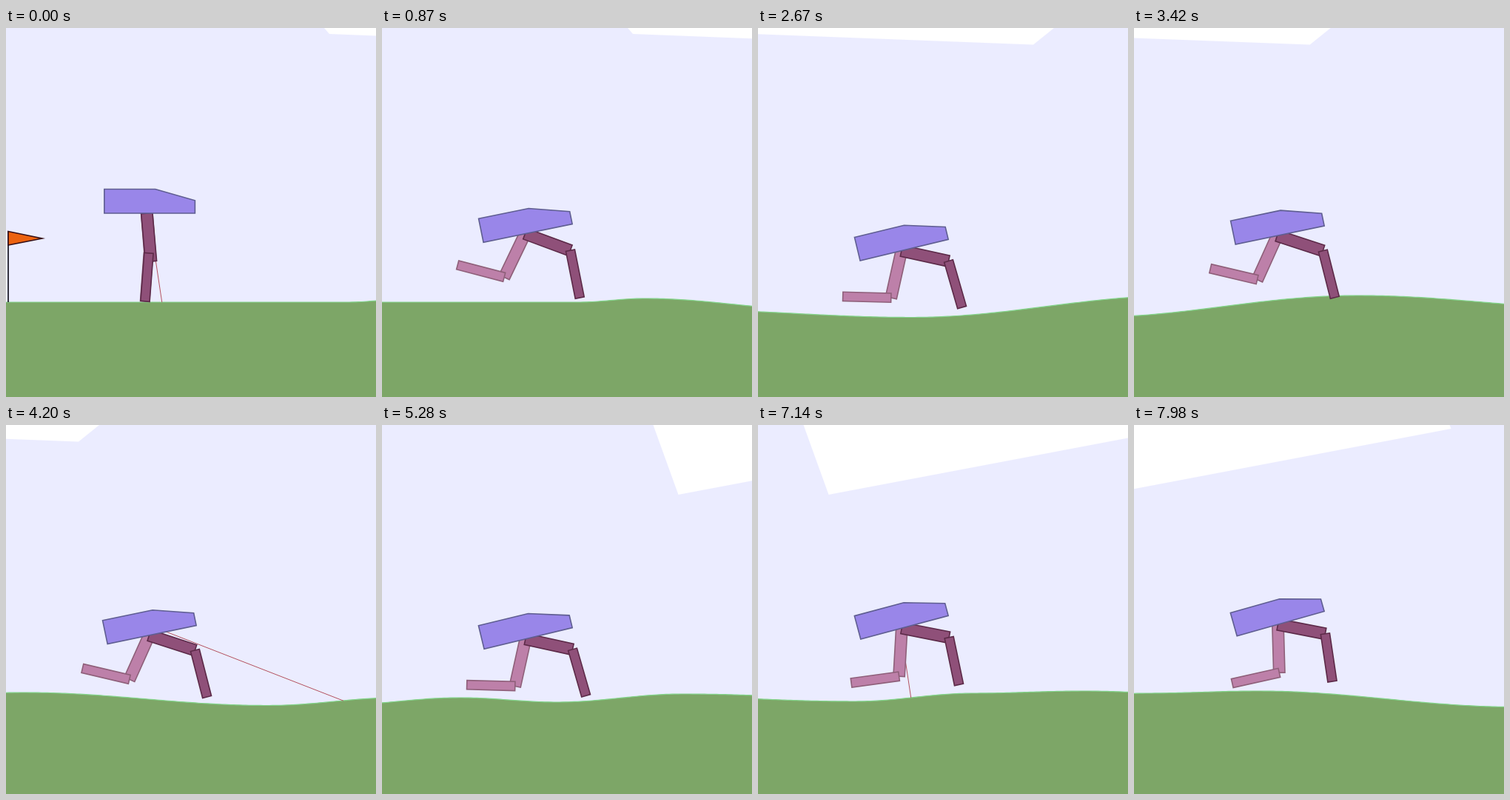
These frames come from a looping animation (500x498 px, 8000 ms). An HTML page with a canvas:

```html
<!DOCTYPE html>
<html lang="en">
<head>
<meta charset="utf-8">
<title>Two-legged runner</title>
<style>
  html, body { margin: 0; height: 100%; overflow: hidden; }
  canvas { display: block; width: 100vw; height: 100vh; }
</style>
</head>
<body>
<canvas id="stage" width="500" height="498"></canvas>
<script>
const ctx = document.getElementById('stage').getContext('2d');
const LOOP = 8000, STEP = 30, WIDTH = 500, HEIGHT = 498;
const UNIT = 1.915, HULL_X = 190.3, LEG = 34 * UNIT, RANGE = 160 * UNIT;
const HULL = [[-30, -9], [6, -9], [34, -1], [34, 8], [-30, 8]];
const RAD = Math.PI / 180, TURN = 2 * Math.PI;

// Crests and dips of the ground in world pixels, eased into each other
const HILLS = [
  [0, 370], [462, 370], [550, 365], [790, 380.5], [1095, 390.5], [1460, 361], [1790, 378.5],
  [1965, 368], [2095, 374], [2265, 363], [2600, 373], [2760, 362], [2910, 359], [3260, 380.5]
];

// Clouds drift at half the ground speed
const CLOUDS = [
  [[430, 0], [437, 8], [816, 22.5], [844, 0]],
  [[1296, 0], [1330, 94], [1800, 5], [1798, 0]]
];

// Pace of the run: time, scroll, strides, hull y, sensor ticks
const PACE = [
  [0, 0, -0.28, 234.7, 1],
  [450, 60, 1.42, 262, 45],
  [1680, 458, 6.12, 264.8, 164],
  [2670, 888, 10.17, 285.7, 261],
  [4200, 1436, 16.06, 268.9, 408],
  [5280, 1859, 20.17, 274, 523],
  [7140, 2469, 27.23, 259.4, 718],
  [7980, 2743, 30.26, 254.5, 799]
];

const linear = f => f;
const smooth = f => (1 - Math.cos(f * Math.PI)) / 2;
const mix = (a, b, f) => a + (b - a) * f;

// Interpolates whole rows keyed by their first column
function sample(rows, key, ease = linear) {
  let i = 1;
  while (i < rows.length - 1 && rows[i][0] < key) i++;
  const a = rows[i - 1], b = rows[i];
  const f = Math.min(1, Math.max(0, (key - a[0]) / (b[0] - a[0])));
  return a.map((v, n) => mix(v, b[n], ease(f)));
}

const groundY = x => sample(HILLS, x, smooth)[1];

function meanGround(scroll) {
  let sum = 0;
  for (let x = 130; x <= 250; x += 20) sum += groundY(x + scroll);
  return sum / 7;
}

// Turn hull y into height above ground, so the hull follows the hills
for (const row of PACE) row[3] = meanGround(row[1]) - row[3];

// Joint angles in degrees; limbs are measured forward from straight down
function gait(strides) {
  const wave = lag => Math.cos((strides - lag) * TURN);
  return {
    tilt: -15.5 + 4 * wave(0),
    nearThigh: 68 + 11 * wave(0.25),
    nearShin: -10 + 27 * wave(0.13),
    farThigh: -26 * wave(0),
    farShin: -79 - 26 * wave(0)
  };
}

const STANDING = { tilt: 0, nearThigh: 5, nearShin: -4.4, farThigh: 4.5, farShin: -4.2 };

function poseAt(t, strides) {
  const pose = gait(strides), start = Math.min(1, t / 450);
  for (const joint in pose) pose[joint] = mix(STANDING[joint], pose[joint], start);
  return pose;
}

function trace(points) {
  ctx.beginPath();
  for (const [x, y] of points) ctx.lineTo(x, y);
}

function line(points, color, width) {
  trace(points);
  ctx.strokeStyle = color;
  ctx.lineWidth = width;
  ctx.stroke();
}

function polygon(points, fill, stroke) {
  trace(points);
  ctx.closePath();
  ctx.fillStyle = fill;
  ctx.fill();
  if (!stroke) return;
  ctx.strokeStyle = stroke;
  ctx.lineWidth = 1.6;
  ctx.stroke();
}

function placed(x, y, degrees, draw) {
  ctx.save();
  ctx.translate(x, y);
  ctx.rotate(degrees * RAD);
  draw();
  ctx.restore();
}

function segment(x, y, angle, width, fill, stroke) {
  const w = width / 2;
  placed(x, y, -angle, () => polygon([[-w, 0], [w, 0], [w, LEG], [-w, LEG]], fill, stroke));
}

// Slack lets the knee overlap until the joints settle
function leg([x, y], thigh, shin, slack, fill, stroke) {
  segment(x, y, thigh, 8 * UNIT, fill, stroke);
  const kneeX = x + LEG * Math.sin(thigh * RAD) - 3 * slack;
  const kneeY = y + LEG * Math.cos(thigh * RAD) - 11 * slack;
  segment(kneeX, kneeY, shin, 6.4 * UNIT, fill, stroke);
}

// Rays sweep out and back during the first 20 of every 100 ticks
function ray(y, scroll, tick) {
  if (tick >= 20) return;
  const angle = 0.15 * Math.min(tick, 19 - tick);
  const dx = Math.sin(angle), dy = Math.cos(angle);
  let d = 0;
  while (d < RANGE && y + d * dy < groundY(HULL_X + d * dx + scroll)) d++;
  line([[HULL_X, y], [HULL_X + d * dx, y + d * dy]], '#b4525f', 1);
}

function ground(scroll) {
  const surface = [];
  for (let x = -4; x <= WIDTH + 4; x += 4) surface.push([x, groundY(x + scroll)]);
  polygon([...surface, [WIDTH + 4, HEIGHT], [-4, HEIGHT]], '#7da667');
  line(surface, '#83d48a', 1.2);
}

function flag(x) {
  line([[x, 274], [x, 370]], '#15151d', 1.7);
  polygon([[x, 274.5], [x + 46, 284], [x, 293]], '#ec6210', '#361018');
}

function draw(t) {
  const [, scroll, strides, height, ticks] = sample(PACE, t);
  const pose = poseAt(t, strides);
  const slack = Math.max(0, 1 - t / 150);
  const y = meanGround(scroll) - height;

  ctx.fillStyle = '#ebecff';
  ctx.fillRect(0, 0, WIDTH, HEIGHT);
  for (const cloud of CLOUDS) polygon(cloud.map(([x, cy]) => [x - scroll / 2, cy]), '#fff');
  ground(scroll);
  ray(y, scroll, Math.floor(ticks + 0.01) % 100);

  const drop = 8 * UNIT, tilt = pose.tilt * RAD;
  const hip = [HULL_X - drop * Math.sin(tilt), y + drop * Math.cos(tilt)];
  leg(hip, pose.farThigh, pose.farShin, slack, '#bd80a9', '#8e5f79');
  leg(hip, pose.nearThigh, pose.nearShin, slack, '#8f5079', '#5c2a48');
  placed(HULL_X, y, pose.tilt, () =>
    polygon(HULL.map(p => p.map(v => v * UNIT)), '#9986e9', '#5f5e91'));

  flag(3 - scroll);
}

function frame() {
  const t = performance.now() % LOOP;
  draw(Math.floor(t / STEP) * STEP);
  requestAnimationFrame(frame);
}
frame();
</script>
</body>
</html>
```
